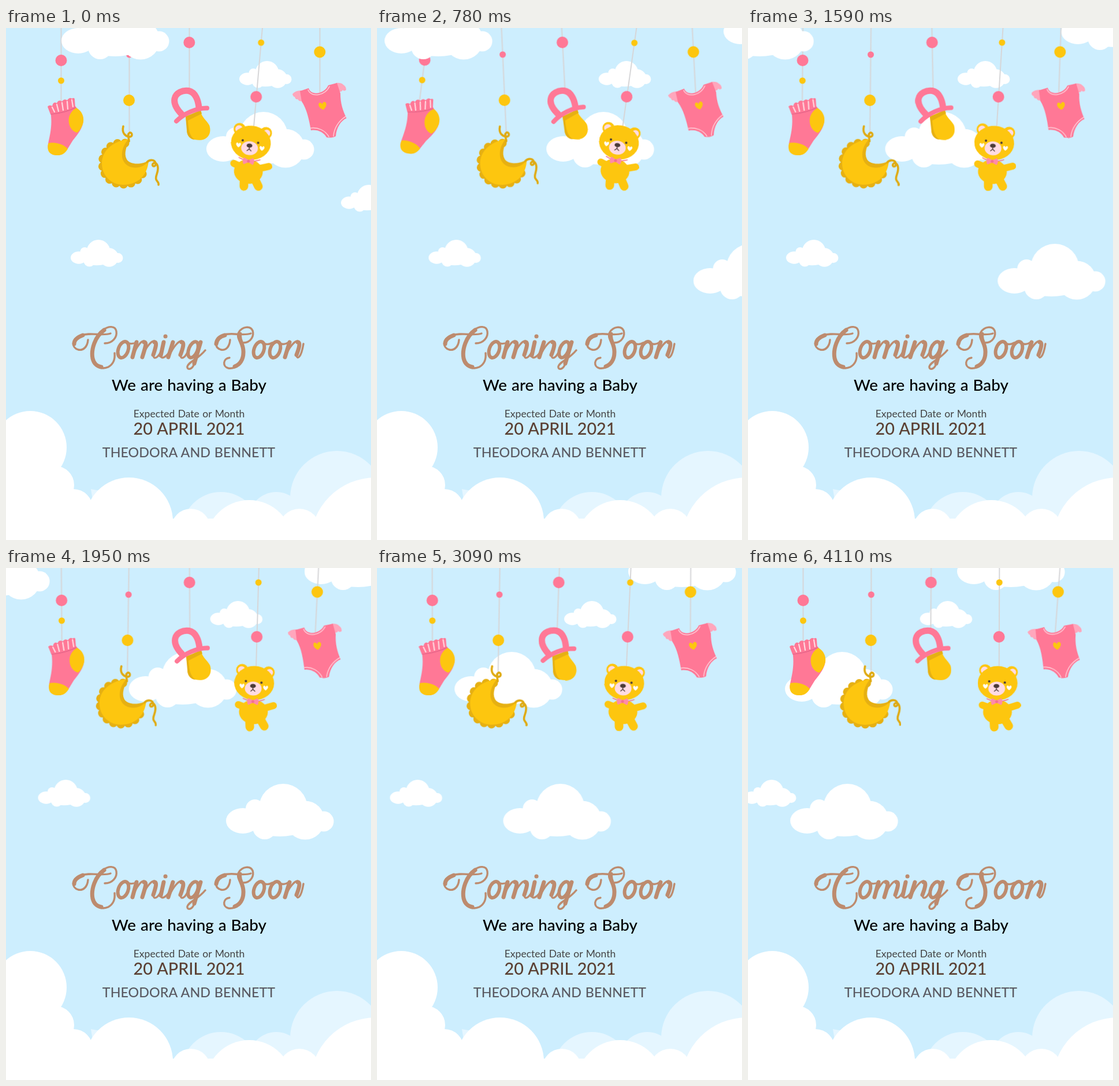
An HTML page that plays this animation: 632 by 885 pixels, repeating every 4140 ms.

```html
<!DOCTYPE html>
<html lang="en">
<head>
<meta charset="utf-8">
<title>Coming Soon</title>
<style>
html, body { margin: 0; height: 100%; overflow: hidden; background: #cdeefe; }
svg { display: block; width: 100vw; height: 100vh; }

.cloud { fill: #fff; animation: drift 4140ms linear infinite; }
@keyframes drift {
  from { transform: translate(var(--from), var(--y)); }
  to { transform: translate(var(--to), var(--y)); }
}

.toy { animation: 4140ms ease-in-out infinite; }
#sock { transform-origin: 95px -45px; animation-name: sock; }
#moon { transform-origin: 213px -45px; animation-name: moon; }
#pacifier { transform-origin: 317px -45px; animation-name: pacifier; }
#bear { transform-origin: 435px 102px; animation-name: bear; }
#onesie { transform-origin: 543.5px -45px; animation-name: onesie; }

@keyframes sock {
  0% { transform: rotate(0deg); animation-timing-function: ease-out; }
  18.84% { transform: rotate(7.3deg); animation-timing-function: ease-in; }
  29.71% { transform: rotate(2.5deg); animation-timing-function: ease-out; }
  47.1% { transform: rotate(-.4deg); }
  63.77% { transform: rotate(1.1deg); }
  85.51% { transform: rotate(-1.4deg); animation-timing-function: ease-in; }
  99.27%, 100% { transform: rotate(0deg); }
}
@keyframes moon {
  0% { transform: rotate(0deg); animation-timing-function: ease-out; }
  18.84% { transform: rotate(-2.6deg); animation-timing-function: ease-in; }
  29.71% { transform: rotate(.1deg); animation-timing-function: ease-out; }
  47.1% { transform: rotate(.85deg); }
  63.77% { transform: rotate(-.5deg); }
  85.51% { transform: rotate(2.4deg); animation-timing-function: ease-in; }
  99.27%, 100% { transform: rotate(.1deg); }
}
@keyframes pacifier {
  0% { transform: rotate(0deg); animation-timing-function: ease-out; }
  18.84% { transform: rotate(-3deg); animation-timing-function: ease-in; }
  29.71% { transform: rotate(-2deg); animation-timing-function: linear; }
  47.1% { transform: rotate(-.3deg); animation-timing-function: linear; }
  63.77% { transform: rotate(1.5deg); animation-timing-function: ease-out; }
  85.51% { transform: rotate(2.4deg); animation-timing-function: ease-in; }
  99.27%, 100% { transform: rotate(.4deg); }
}
@keyframes bear {
  0% { transform: rotate(5deg); animation-timing-function: ease-out; }
  18.84% { transform: rotate(8deg); animation-timing-function: ease-in; }
  29.71% { transform: rotate(5.7deg); animation-timing-function: linear; }
  47.1% { transform: rotate(1.6deg); animation-timing-function: ease-out; }
  63.77% { transform: rotate(.7deg); }
  85.51% { transform: rotate(4.5deg); }
  99.27%, 100% { transform: rotate(.2deg); }
}
@keyframes onesie {
  0% { transform: rotate(0deg); animation-timing-function: ease-out; }
  18.84% { transform: rotate(-3deg); animation-timing-function: ease-in; }
  29.71% { transform: rotate(-.1deg); animation-timing-function: ease-out; }
  47.1% { transform: rotate(2.9deg); }
  63.77% { transform: rotate(-2.3deg); }
  85.51% { transform: rotate(2.9deg); animation-timing-function: ease-out; }
  91.3%, 100% { transform: rotate(4.2deg); }
}

.pink { fill: #ff7896; }
.yellow { fill: #fdc60f; }
.amber { fill: #e6b012; }
.blush { fill: #ffdbe3; }
.dark { fill: #4b3b38; }
.line { fill: none; stroke-linecap: round; stroke-linejoin: round; }
.string { stroke: #d6d6d8; stroke-width: 2; }
.ribbon { stroke: #dfaa12; stroke-width: 3.6; }
.trim { stroke: #ffc6d3; stroke-width: 1.6; }
.limb { stroke: #fdc60f; }
.script { stroke: #bd8b6e; }
.copy { font-family: Lato, "Open Sans", sans-serif; text-anchor: middle; word-spacing: .06em; }
</style>
</head>
<body>
<svg viewBox="0 0 632 885" preserveAspectRatio="none">
  <defs>
    <g id="puff">
      <ellipse cx="29" cy="64" rx="29" ry="22"/>
      <circle cx="50" cy="43" r="16"/>
      <circle cx="99" cy="42" r="42"/>
      <circle cx="67" cy="75" r="21"/>
      <circle cx="137" cy="63" r="33.5"/>
      <circle cx="169" cy="65" r="17.5"/>
      <ellipse cx="93" cy="65" rx="55" ry="26"/>
    </g>
    <path id="heart" d="M0 6C-10 0-7-8-3-7Q0-6 0-3Q0-6 3-7C7-8 10 0 0 6Z"/>
  </defs>

  <rect width="632" height="885" fill="#cdeefe"/>

  <g class="cloud" style="--from:656px;--to:360px;--y:-58px"><use href="#puff"/></g>
  <g class="cloud" style="--from:347px;--to:62px;--y:145px"><use href="#puff"/></g>
  <g class="cloud" style="--from:659px;--to:69px;--y:373px"><use href="#puff"/></g>
  <g class="cloud" style="--from:404px;--to:297px;--y:57px"><use href="#puff" transform="scale(.485)"/></g>
  <g class="cloud" style="--from:112px;--to:-8px;--y:366px"><use href="#puff" transform="scale(.485)"/></g>
  <g class="cloud" style="--from:580px;--to:953px;--y:271px"><use href="#puff" transform="scale(.485)"/></g>

  <g id="sock" class="toy">
    <path class="line string" d="M95.5-50V128"/>
    <circle class="pink" cx="95.5" cy="56" r="10"/>
    <circle class="yellow" cx="95.5" cy="91" r="5.5"/>
    <path class="pink" d="M77 144C81 168 76 185 73 200C70 214 80 221 91 220C104 218 108 206 116 194C124 184 134 172 134 159C134 148 126 143 120 135Z"/>
    <path class="yellow" d="M122 138C132 144 135 153 134 162C132 172 127 178 123 181C112 178 107 166 109 155C111 146 117 141 122 138Z"/>
    <path class="yellow" d="M73.5 199C86 196 102 202 107 209C102 218 95 220 90 220C78 221 69 214 73.5 199Z"/>
    <path class="pink" d="M77 149L72 136Q75 132 80 135Q82 126 88 130Q91 123 97 127Q101 121 106 125Q110 119 114 122Q119 119 119 124L120 138Q100 147 77 149Z"/>
    <path class="line" stroke="#e8668a" stroke-width="1.6" d="M78 149Q101 147 120 138"/>
    <path class="line" stroke="#ffd9e1" stroke-width="2.2" d="M80 137l4 8M88 132l3 12M97 129l2 13M106 127l1 13M114 124l2 12"/>
  </g>

  <g id="moon" class="toy">
    <path class="line string" d="M213.5-50V186"/>
    <circle class="pink" cx="213.5" cy="46" r="5.5"/>
    <circle class="yellow" cx="213" cy="125" r="10"/>
    <path class="line" stroke="#e6b012" stroke-width="15" stroke-dasharray="0 13" d="M206 199C183 196 167 213 167 234C167 255 183 270 203 270C224 270 237 258 240 241"/>
    <path class="yellow" d="M213 192C208 205 200 215 206 228C213 240 235 237 247 229C245 256 227 271 203 271C182 271 166 255 166 234C166 213 183 196 213 192Z"/>
    <path class="amber" d="M213 191C199 206 197 225 207 235C219 246 238 242 247 230C236 235 216 238 209 227C203 216 210 204 213 191Z"/>
    <path class="line ribbon" d="M203 170C200 182 207 187 213 188C220 189 219 180 214 181C209 184 213 190 213 196M244 232C250 226 258 228 259 234C260 241 252 240 254 235C258 230 263 235 263 243C263 252 258 256 260 262C262 266 265 267 264 271"/>
  </g>

  <g id="pacifier" class="toy">
    <path class="line string" d="M317.5-50V104"/>
    <circle class="pink" cx="317.3" cy="25" r="10"/>
    <path class="yellow" d="M311 153C312 162 314 170 313 178C315 191 328 195 339 193.5C352 191 356 179 352 168C347 159 338 154 337 143Z"/>
    <path class="amber" d="M311 153L313 177C313 187 320 193 327 193C317 187 316 174 315 160L339 148L337 142Z"/>
    <path class="line" stroke="#ff7896" stroke-width="11" d="M305 150C297 142 290 132 292 122C294 112 306 107 316 108.5C328 111 333 125 334 138"/>
    <path class="line" stroke="#ff7896" stroke-width="8" d="M295 161C308 148 330 138 348 138.5"/>
  </g>

  <g id="bear" class="toy">
    <path class="line string" d="M435-50V173"/>
    <circle class="yellow" cx="435" cy="25" r="5.5"/>
    <circle class="pink" cx="434.7" cy="119" r="10"/>
    <circle class="yellow" cx="411" cy="177" r="10.5"/>
    <circle class="yellow" cx="457" cy="180" r="10.5"/>
    <circle class="blush" cx="410" cy="177" r="6.5"/>
    <circle class="blush" cx="458.5" cy="180" r="6"/>
    <path class="line limb" stroke-width="12" d="M406 237L420 242M467 237L448 243"/>
    <path class="line limb" stroke-width="15" d="M426 260L427 275M443 258L452 273"/>
    <ellipse class="yellow" cx="432.500" cy="249" rx="25" ry="21"/>
    <ellipse class="yellow" cx="432.500" cy="199" rx="34.500" ry="29.500"/>
    <ellipse class="blush" cx="431" cy="208.500" rx="14.500" ry="12"/>
    <circle class="dark" cx="418" cy="196" r="2"/>
    <circle class="dark" cx="445" cy="198" r="2"/>
    <ellipse class="dark" cx="430.500" cy="204" rx="5" ry="3.600"/>
    <path class="line" stroke="#4b3b38" stroke-width="1.5" d="M430.500 207V210M427 213L430.500 210L434 213"/>
    <use href="#heart" fill="#fff" transform="translate(411.500 205) scale(.62)"/>
    <use href="#heart" fill="#fff" transform="translate(452.500 207.500) scale(.62)"/>
    <path class="line" stroke="#ef7a92" stroke-width="1.5" d="M414 226Q432 235 451 227"/>
    <path fill="#ff8ba8" d="M431 229L423 225Q419 231 423 237L431 233L439 237Q443 231 439 225Z"/>
    <circle cx="431" cy="231" r="2.5" fill="#f26f92"/>
  </g>

  <g id="onesie" class="toy">
    <path class="line string" d="M543.5-50V116"/>
    <circle class="yellow" cx="543.3" cy="41.5" r="10"/>
    <path fill="#ffa6bc" d="M511 108Q501 108 496 114Q497 119 500 119Q501 124 505 123Q508 128 513 126ZM571 95Q580 94 584 98Q589 101 589 107Q585 110 583 107Q581 111 576 110Z"/>
    <path class="pink" d="M509 109L524 104C528 118 552 114 558 99L573 95L579 113C579 130 583 142 589.5 156C580 160 572 172 571 187C566 190 560 190 555 189C550 180 539 175 528 177C525 160 521 140 512 127Z"/>
    <path class="line trim" d="M523 107C529 121 553 117 560 101M527 173C540 171 553 177 559 188M567 187C568 172 577 160 588 153"/>
    <use class="yellow" href="#heart" transform="translate(548.5 135.5) rotate(-10)"/>
  </g>

  <g class="cloud" style="--from:96px;--to:-343px;--y:-42px"><use href="#puff"/></g>

  <g fill="#e5f6ff">
    <circle cx="573" cy="812" r="81"/>
    <circle cx="372" cy="870" r="68"/>
    <circle cx="468" cy="850" r="48"/>
    <path d="M147 797L168 801L150 815Z"/>
  </g>
  <g fill="#fff">
    <circle cx="42" cy="725" r="63"/>
    <circle cx="85" cy="790" r="33"/>
    <circle cx="117" cy="830" r="33"/>
    <circle cx="213" cy="853" r="76"/>
    <circle cx="320" cy="865" r="34"/>
    <circle cx="421" cy="892" r="76"/>
    <circle cx="508" cy="867" r="36"/>
    <circle cx="640" cy="890" r="113"/>
    <path d="M0 725H60L85 790L140 825L180 848H632V885H0Z"/>
  </g>

  <g class="line script" role="img" aria-label="Coming Soon">
    <g stroke-width="3.4">
      <path d="M142 539C141 552 133 558 125 556C113 552 113 538 128 532C146 525 166 533 181 528"/>
      <path d="M171 545C184 545 193 535 191 524C189 514 177 515 168 522C154 533 146 556 149 572C152 586 166 591 177 586C186 581 189 572 188 562"/>
      <path d="M206 543C214 547 222 546 226 543M220 567C226 550 234 541 239 541M237 566C243 550 252 541 257 541M255 566C256 573 262 571 268 560M268 566C268 573 276 570 283 560M283 566C290 550 299 541 304 541M302 566C303 573 309 571 314 561M326 580C322 592 313 591 314 585C316 577 332 573 345 557"/>
      <path d="M388 539C387 552 380 558 372 556C360 552 361 538 375 531C390 525 408 533 424 528"/>
      <path d="M411 544C424 544 430 532 427 523C423 514 409 516 403 526C397 538 412 546 412 562C412 580 396 590 385 588C374 585 376 571 387 570"/>
      <path d="M442 543C449 548 456 547 461 544M470 543C477 548 484 547 488 544M484 567C491 550 500 541 505 541M503 566C504 573 511 571 515 546"/>
    </g>
    <g stroke-width="7">
      <path d="M118 546C118 538 125 534 133 531M170 522C154 533 147 556 150 571C152 580 158 585 165 586M405 529C402 540 412 546 411 561C411 573 405 582 396 585M364 546C365 537 371 533 379 531"/>
      <path d="M226 543L219 569M239 543C244 543 242 550 236 569M257 543C262 543 259 553 255 565M273 543L268 566M289 543L281 569M304 543C309 543 307 552 302 565M337 543L326 580M491 543L483 569M505 543C510 543 508 552 503 565"/>
      <path d="M276 533h.1"/>
    </g>
    <g stroke-width="6">
      <ellipse cx="203" cy="556" rx="8.5" ry="14.5" transform="rotate(20 203 556)"/>
      <ellipse cx="324" cy="556" rx="7.5" ry="14.5" transform="rotate(22 324 556)"/>
      <ellipse cx="438" cy="556" rx="8.5" ry="14.5" transform="rotate(20 438 556)"/>
      <ellipse cx="466" cy="556" rx="8.5" ry="14.5" transform="rotate(20 466 556)"/>
    </g>
  </g>

  <g class="copy">
    <text x="317" y="627" font-size="27.8" font-weight="500" fill="#000">We are having a Baby</text>
    <text x="317" y="672.5" font-size="17.5" fill="#434343">Expected Date or Month</text>
    <text x="317" y="703" font-size="28.8" font-weight="500" fill="#5b4033">20 APRIL 2021</text>
    <text x="316.5" y="742" font-size="23.3" font-weight="500" fill="#5a5a62">THEODORA AND BENNETT</text>
  </g>
</svg>
</body>
</html>
```
